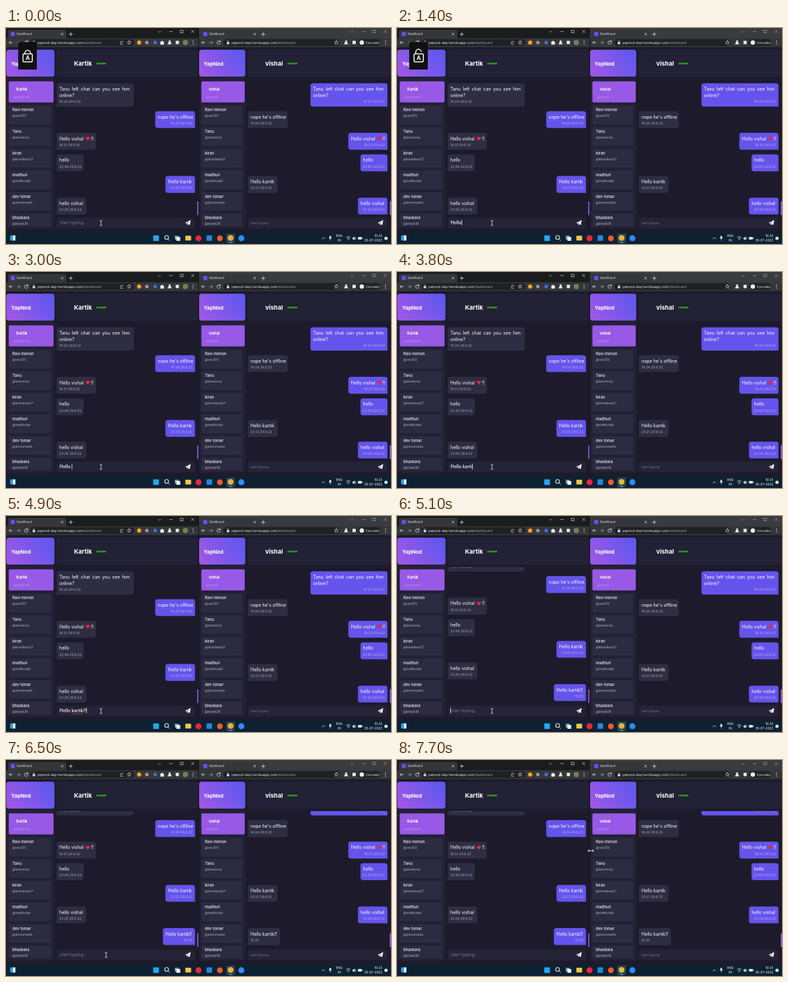
Animation, 600 px wide and 338 px high, one loop 8 s. Source, as an HTML page:

```html
<!DOCTYPE html>
<html lang="en">
<head>
<meta charset="utf-8">
<title>Two chat windows</title>
<style>
html, body { margin: 0; width: 100%; height: 100%; overflow: hidden; background: #1d1b2b; }
svg { display: block; width: 100vw; height: 100vh; font-family: Inter, "Open Sans", sans-serif; }
text { white-space: pre; }
.line { fill: none; stroke: #d8d9dc; stroke-width: .9; stroke-linecap: round; stroke-linejoin: round; }
</style>
</head>
<body>
<svg id="stage" viewBox="0 0 600 338"></svg>
<script>
const LOOP = 8000;
const stage = document.getElementById('stage');
const $ = id => document.getElementById(id);

const rect = (x, y, w, h, fill, r = 0, extra = '') =>
  `<rect x="${x}" y="${y}" width="${w}" height="${h}" rx="${r}" fill="${fill}" ${extra}/>`;
const dot = (x, y, r, fill) => `<circle cx="${x}" cy="${y}" r="${r}" fill="${fill}"/>`;
const line = (d, extra = '') => `<path class="line" d="${d}" ${extra}/>`;
const text = (x, y, size, str, fill = '#fff', extra = '') =>
  `<text x="${x}" y="${y}" font-size="${size}" fill="${fill}" ${extra}>${str}</text>`;

const contacts = [
  ['Ravi menon', '@ravi305'], ['Tanu', '@tanumony'], ['kiran', '@kirandeep27'],
  ['madhuri', '@madhuripk'], ['dev tomar', '@devtomarbk'], ['bhaskara', '@bhas638']
];

// text, time, bubble width, sent from the left window
const messages = [
  ['Tanu left chat can you see him', '14:24 28:6:22', 120, false],
  ["nope he's offline", '14:24 28:6:22', 62, true],
  ['Hello vishal', '19:31 29:6:22', 61, false],
  ['hello', '22:48 29:6:22', 42, false],
  ['Hello kartik', '23:21 29:6:22', 46, true],
  ['hello vishal', '23:28 29:6:22', 46, false],
  ['Hello kartik!!', '10:25', 50, true]
];

function bubble([str, time, w, fromLeft], i, left, cx) {
  const own = fromLeft === left;
  const end = cx + (left ? 215.5 : 217.5);
  const x = own ? end - w : cx;
  const y = i ? 130.2 + (i - 1) * 33.8 : 86.5;
  const h = i ? 26.4 : 36.5;
  const b = y + h, r = x + w;
  const shape = own
    ? `M${x + 4} ${y}H${r - 4}q4 0 4 4V${b}H${x + 4}q-4 0 -4 -4V${y + 4}q0 -4 4 -4Z`
    : `M${x + 4} ${y}H${r - 4}q4 0 4 4V${b - 4}q0 4 -4 4H${x}V${y + 4}q0 -4 4 -4Z`;
  const tx = x + 4;
  let out = `<path d="${shape}" fill="${own ? '#6554eb' : '#2f2d42'}"/>`;
  out += text(tx, y + 11.6, 7, str, '#fff', i ? '' : 'word-spacing="1.5"');
  if (!i) out += text(tx, y + 21.3, 7, 'online?');
  if (i === 2) {
    out += `<path transform="translate(${x + 48.5} ${y + 9}) scale(.88)" fill="#e9283c"
      d="M0 3.5C-5 0 -3.8 -3 -1.9 -3C-.8 -3 -.2 -2.3 0 -1.6C.2 -2.3 .8 -3 1.9 -3C3.8 -3 5 0 0 3.5Z"/>`;
    out += text(x + 53.6, y + 11.6, 7, '!!');
  }
  const tf = own ? '#b5adf4' : '#a9a8b6';
  out += own ? text(r - 4, b - 5.6, 5.2, time, tf, 'text-anchor="end"')
             : text(tx, b - 5.6, 5.2, time, tf);
  return out;
}

function browser(x, left) {
  const strip = left ? '#1b1c1e' : '#3a3b3f';
  const soft = left ? '#d8d9dc' : '#a5a6aa';
  let out = rect(x, 0, 300, 17, strip) + rect(x + 3, 3, 91, 16, '#35363a', 3);
  out += rect(x, 16, 300, 14, '#35363a');
  out += rect(x + 7.3, 6.3, 6.4, 6.4, '#6b4df0', 1.2) + text(x + 16.5, 11.3, 4.5, 'DashBoard', '#dfe0e3');
  out += line(`M${x + 86} 8l3 3m0 -3l-3 3M${x + 98.5} 9.7h5m-2.5 -2.5v5`);
  out += line(`M${x + 237.5} 5l1.8 1.8l1.8 -1.8M${x + 255} 5.6h4.4M${x + 272} 3.5h4v4h-4zM${x + 289} 3.5l4 4m0 -4l-4 4`, `style="stroke:${soft};stroke-width:.7"`);
  out += line(`M${x + 10} 22.8h-5m2 -2l-2 2l2 2`);
  out += line(`M${x + 17} 22.8h5m-2 -2l2 2l-2 2`, 'opacity=".6"');
  out += line(`M${x + 34} 21.5a2.7 2.7 0 1 0 .2 2.2m-.2 -3.8v1.8h-1.8`);
  const bar = left ? 38 : 39;
  out += rect(x + bar, 17.5, left ? 162 : 181, 10.6, '#202124', 5.3);
  const ux = x + (left ? 48.5 : 51);
  out += rect(ux - 7, 22, 4, 3.4, '#cfd0d3', .5) + line(`M${ux - 6.2} 22v-1a1.2 1.2 0 0 1 2.4 0v1`, 'style="stroke-width:.6"');
  out += text(ux, 24.9, 5.3, 'yapnod-dep.herokuapp.com<tspan fill="#9a9ba0">/dashboard</tspan>', '#e8e9ec');
  return out;
}

const star = x => line(`M${x} 19.6l.9 2l2.2 .2l-1.7 1.5l.5 2.2l-1.9 -1.2l-1.9 1.2l.5 -2.2l-1.7 -1.5l2.2 -.2z`, 'style="stroke-width:.7"');
const flask = x => `<path fill="#e8e9ec" d="M${x - 1.4} 19.5h2.8v2.2l1.9 3.8h-6.6l1.9 -3.8z"/>`;
const menu = x => [20.3, 22.8, 25.3].map(y => dot(x, y, .7, '#d8d9dc')).join('');

function tools() {
  let out = line('M178.3 24.5v-3h2m0 -1.5l2 1.8l-2 1.8M178.3 25.5h4', 'opacity=".7"') + star(192);
  out += dot(207.5, 22.8, 3.2, '#f4a623') + dot(219.5, 22.8, 2.8, '#9c9486');
  out += rect(230, 20.2, 5, 5, '#3d6df0', .8);
  out += `<path fill="#e8e9ec" d="M240.5 21h1.6a1.1 1.1 0 0 1 2.2 0h1.6v1.7a1.1 1.1 0 0 1 0 2v1.3h-5.4z"/>`;
  out += flask(255) + rect(264.5, 20, 5, 5.2, '#e8e9ec', .5);
  out += dot(279.5, 22.8, 4, '#6f8a52') + dot(279.5, 21.8, 1.6, '#8a6a50') + menu(291.5);
  out += star(515) + flask(530) + rect(540, 20, 5, 5.2, '#e8e9ec', .5);
  out += rect(548.5, 17.5, 35, 10.6, '#202124', 5.3) + dot(554.5, 22.8, 3.5, '#e8e9ec');
  out += text(560.5, 24.5, 4.2, 'Concealed', '#e8e9ec') + menu(591.5);
  return out;
}

function page(left) {
  const x = left ? 0.5 : 301, sw = left ? 75 : 71.8, sx = left ? 4.3 : 304.5;
  const cx = left ? 79 : 377, o = left ? 0 : 300, end = left ? 300 : 600;
  const id = left ? 'L' : 'R';
  let out = rect(o, 30, 300, 290, '#1d1b2b');
  out += rect(x, 34, sw, 280, '#232135', 4) + rect(x, 34, sw, 42, 'url(#brand)', 4);
  out += text(o + 8, 58.5, 8, 'YapNod', '#fff', 'font-weight="700"');
  out += rect(sx, 83.5, left ? 69.7 : 67.5, 33, '#9859e6', 2);
  out += text(o + 16, 97.6, 5.8, left ? 'Kartik' : 'vishal', '#fff', 'font-weight="700"');
  out += text(o + 12, 109.5, 4.6, left ? '@kartikvelu' : '@vishalt', '#c08ff0');
  contacts.forEach(([name, handle], i) => {
    const y = 121.7 + i * 33.8;
    out += rect(sx, y, left ? 66 : 63.5, i === 5 ? 20 : 29.2, '#2d2b40', 2);
    out += text(o + 10, y + 8.7, 6, name, '#f4f4f7', 'font-weight="500"');
    out += text(o + 10, y + 17.6, 4.7, handle, '#b4b3c0');
  });
  out += rect(cx, 34, end - cx, 42.5, '#232135', 3);
  out += text(cx + 27, 58.5, 9.5, left ? 'Kartik' : 'vishal', '#fff', 'font-weight="700"');
  out += text(cx + 61.5, 56.8, 4.1, 'ONLINE', '#35dc12', 'font-weight="800"');
  out += `<g clip-path="url(#chat)"><g id="feed${id}">`;
  messages.forEach((m, i) => {
    out += i < 6 ? bubble(m, i, left, cx) : `<g id="new${id}">${bubble(m, i, left, cx)}</g>`;
  });
  out += '</g></g>';
  out += rect(end - 2, 271, 2, 22, '#8f56dd', 1);
  out += rect(cx, 297, left ? 215 : 217, 16.5, '#252338', 3);
  out += `<path fill="#fff" transform="translate(${left ? 279 : 579} 300)" d="M8.8 .4L7.5 8.2L4.8 7L3.4 8.8V6.4L7 2.2L2.6 6L.2 5Z"/>`;
  if (!left) out += text(381, 307, 5.2, 'start typing', '#77768a');
  return out;
}

function taskbar() {
  let out = rect(0, 320, 600, 18, '#0e2132');
  out += rect(6.5, 324.5, 8, 8, '#3aa0ea', 1) + rect(11, 324.5, 3.5, 8, '#e6f0f8', .5);
  out += rect(229.5, 324.5, 8.8, 8.8, '#27a6f2', .6);
  out += '<circle cx="250.3" cy="327.8" r="3" fill="none" stroke="#e8edf2" stroke-width="1.1"/>' + line('M252.7 330.2l2.3 2.4');
  out += rect(263, 325, 6, 6, '#8d98a3', .6) + rect(265.5, 327, 6, 6, '#f0f3f6', .6);
  out += rect(279.5, 325, 9, 7.6, '#f6c544', 1);
  out += dot(300, 329, 4.7, '#f0243c') + rect(312.5, 324.5, 8.6, 8.6, '#2389d8', 1);
  out += dot(333.3, 329, 4.5, '#f05a28');
  out += rect(343, 321.5, 14, 15, '#2c3f50', 2) + dot(350, 328.5, 4.6, '#e0b53a') + rect(347, 335.2, 6, 1.1, '#63b7ee', .5);
  out += dot(366.8, 329, 4.7, '#2d8cff');
  out += line('M492.5 330l2 -2l2 2');
  out += rect(504, 325.3, 2.6, 4.4, '#e8edf2', 1.3) + line('M503 328.5q2.3 3.5 4.6 0m-2.3 2v2', 'style="stroke-width:.6"');
  out += text(519.5, 327.3, 4.8, 'ENG', '#fff', 'text-anchor="middle"') + text(519.5, 333.8, 4.8, 'IN', '#fff', 'text-anchor="middle"');
  out += line('M530.5 327.5q3 -2.6 6 0M531.8 329.3q1.7 -1.4 3.4 0') + dot(533.5, 331.2, .8, '#fff');
  out += '<path fill="#e8edf2" d="M540 328h1.3l2 -1.8v6l-2 -1.8h-1.3z"/>' + line('M544.6 327.6q1.2 1.6 0 3.2');
  out += rect(548.5, 327, 6, 4, '#e8edf2', .8) + rect(554.7, 328, .9, 2, '#e8edf2');
  out += text(586.5, 327.3, 4.9, '10:25', '#fff', 'text-anchor="end"') + text(586.5, 333.8, 4.9, '30-07-2022', '#fff', 'text-anchor="end"');
  return out + dot(592.2, 329, 2.6, '#dce4ea');
}

stage.innerHTML = `<defs>
  <linearGradient id="brand" x1="0" y1=".7" x2="1" y2=".3"><stop stop-color="#9d57e6"/><stop offset="1" stop-color="#5f58ee"/></linearGradient>
  <clipPath id="chat"><rect y="80" width="600" height="215.5"/></clipPath></defs>`
  + rect(0, 0, 600, 338, '#141420')
  + browser(0, true) + browser(300, false) + tools() + page(true) + page(false)
  + rect(299.8, 0, 1, 320, '#15151b') + taskbar()
  + text(83.5, 307.4, 6.9, '', '#fff', 'id="entry"')
  + rect(83.5, 308.8, 1, .8, '#d8384a', 0, 'id="spelling"')
  + rect(83, 300.3, .8, 8.4, '#fff', 0, 'id="caret"')
  + `<g id="lock">${rect(19, 22, 29, 43, '#101011')}
    <g fill="none" stroke="#fff" stroke-width="1.5"><rect x="26.5" y="40.5" width="14.5" height="12.5" rx="1.5"/><path id="shackle"/></g>
    ${text(33.8, 50.2, 9, 'A', '#fff', 'text-anchor="middle" font-weight="700"')}</g>`
  + `<g id="beam">${line('M-1.6 -3.8q1.6 0 1.6 1q0 -1 1.6 -1M0 -2.8v5.6M-1.6 3.8q1.6 0 1.6 -1q0 1 1.6 1')}</g>`
  + `<path id="arrow" d="M0 0v8l2 -1.8l1.3 2.8l1.2 -.6l-1.3 -2.7h2.6z" fill="#fff" stroke="#222" stroke-width=".4"/>`
  + `<path id="resize" d="M-5 0l2.6 -2.4v1.7h4.8v-1.7l2.6 2.4l-2.6 2.4v-1.7h-4.8v1.7z" fill="#fff" stroke="#222" stroke-width=".5"/>`;

const message = 'Hello kartik!!';
const keys = [500, 800, 1000, 1200, 1400, 2900, 3200, 3300, 3500, 3700, 3800, 4000, 4600, 4800];
const SENT = 5100, RECEIVED = 5300;
const show = (id, on) => $(id).setAttribute('visibility', on ? 'visible' : 'hidden');
const ramp = (t, a, b) => Math.min(1, Math.max(0, (t - a) / (b - a)));

function drawEntry(t) {
  const count = t < SENT ? keys.filter(k => k <= t).length : 0;
  const entry = $('entry');
  const str = count ? message.slice(0, count) : 'start typing...';
  if (entry.textContent !== str) entry.textContent = str;
  entry.setAttribute('fill', count ? '#fff' : '#77768a');
  entry.setAttribute('font-weight', count ? 500 : 400);
  $('caret').setAttribute('x', count ? 83.8 + entry.getComputedTextLength() : 83);
  const lastInput = t >= 4900 ? 4900 : count ? keys[count - 1] : 400;
  show('caret', t >= 400 && (t - lastInput) % 1000 < 500);

  // the finished unknown word gets a red underline
  const done = count === message.length;
  show('spelling', done);
  if (done) {
    $('spelling').setAttribute('x', 83.5 + entry.getSubStringLength(0, 6));
    $('spelling').setAttribute('width', entry.getSubStringLength(6, 6));
  }
}

function drawFeed(id, arrived) {
  $('feed' + id).setAttribute('transform', `translate(0 ${arrived ? -36.2 : 0})`);
  show('new' + id, arrived);
}

function drawMouse(t) {
  const slide = 148 + 8 * ramp(t, 6300, 6500);
  const p = ramp(t, 7300, 7700), e = 1 - (1 - p) ** 2;
  const x = slide + (302 - slide) * e, y = 305.3 - 163.3 * e;
  const kind = y > 297 ? 'beam' : x < 298 ? 'arrow' : 'resize';
  for (const id of ['beam', 'arrow', 'resize']) show(id, id === kind);
  $(kind).setAttribute('transform', `translate(${x} ${y})`);
}

function draw(now) {
  const t = now % LOOP;
  drawEntry(t);
  drawFeed('L', t >= SENT);
  drawFeed('R', t >= RECEIVED);
  drawMouse(t);
  $('lock').setAttribute('opacity', 1 - ramp(t, 1750, 2650));
  $('shackle').setAttribute('d', t < 400
    ? 'M29.3 40.5V39.5a4.5 4.5 0 0 1 9 0V40.5'
    : 'M29.3 40.5V37.8a4.2 4.2 0 0 1 8.4 -.6');
}

const start = performance.now();
function tick() {
  draw(performance.now() - start);
  requestAnimationFrame(tick);
}
tick();
</script>
</body>
</html>
```
